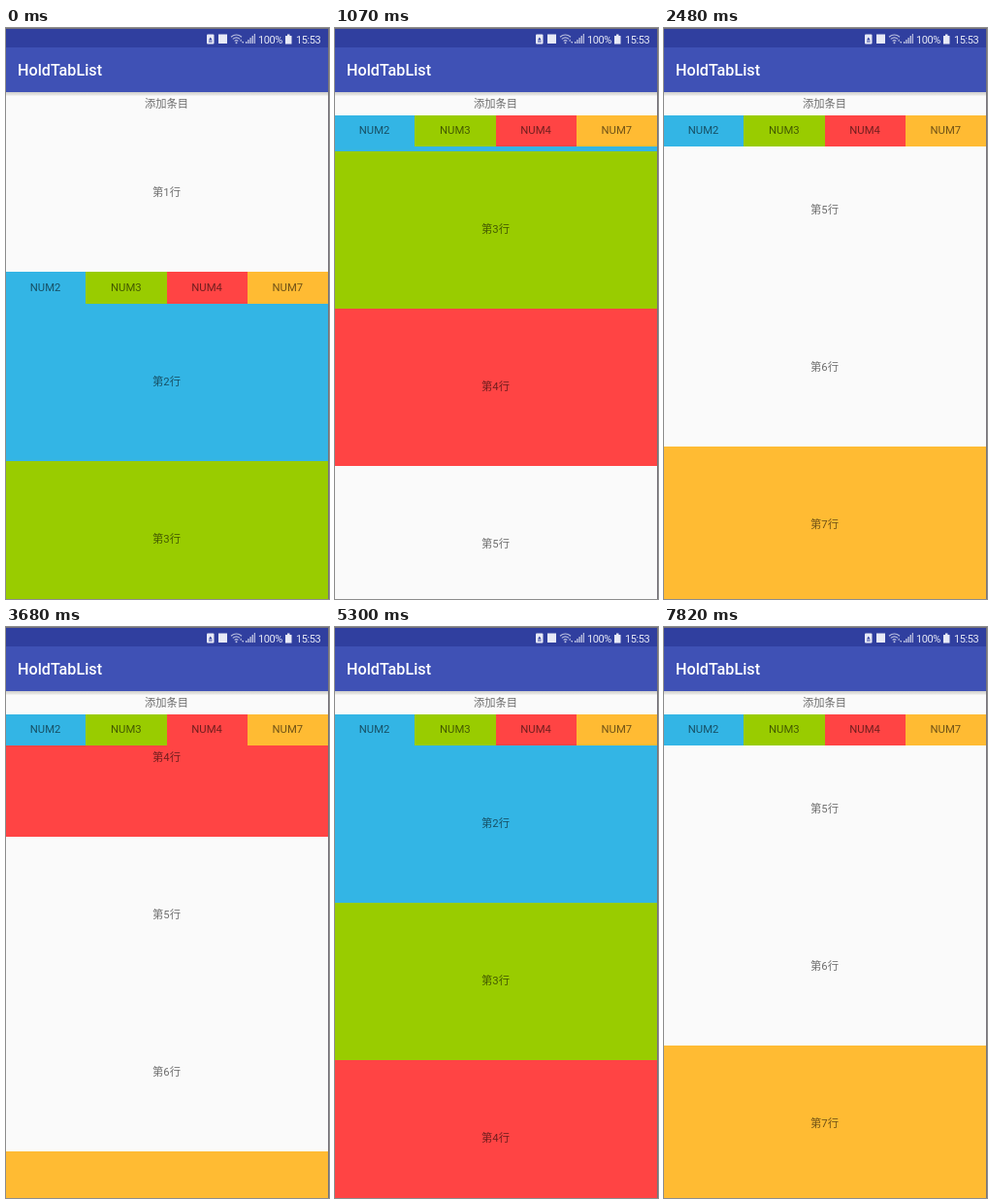
An HTML page that plays this animation: 333x588 px, repeating every 8000 ms.

```html
<!DOCTYPE html>
<html lang="zh-CN">
<head>
<meta charset="utf-8">
<title>Sticky tabs</title>
<style>
  html, body { margin: 0; width: 100%; height: 100%; overflow: hidden; }
  #stage {
    position: relative; width: 333px; height: 588px; overflow: hidden;
    background: #fafafa; color: rgba(0, 0, 0, .56);
    font: 11.3px/1 Roboto, "Noto Sans CJK SC", "Noto Sans CJK", sans-serif;
  }
  #stage > * { position: absolute; left: -1px; width: 333px; }
  .mid { display: flex; align-items: center; justify-content: center; }
  #rows { top: 89px; }
  #rows .mid { height: 162px; }
  #rows .mid:first-child { margin-bottom: 33px; } /* room for the tabs */
  #tabs { top: 0; height: 33px; display: flex; }
  #tabs .mid { width: 25%; }
  #add { top: 66px; height: 24px; background: linear-gradient(#cfcfcc, #e6e6e3 3px, #fafafa 4px); }
  #add span { padding-top: 2px; }
  #bar { top: 20px; height: 46px; background: #3f51b5; }
  #bar span {
    position: absolute; left: 13px; top: 0; line-height: 47px;
    color: #fff; font-size: 16.2px; font-weight: 500;
  }
  #stage > #status { left: 0; top: 0; height: 20px; background: #303f9f; }
  #status text { font: 11px Roboto, sans-serif; letter-spacing: -.4px; }
  #stage > #edge {
    left: 0; top: 0; height: 588px; box-sizing: border-box;
    border: solid #77737a; border-width: 1px 1px 0 0;
  }
</style>
</head>
<body>
<div id="stage">
  <div id="rows"></div>
  <div id="tabs"></div>
  <div id="add" class="mid"><span>添加条目</span></div>
  <div id="bar"><span>HoldTabList</span></div>
  <svg id="status" width="333" height="20" fill="#e8eaf6">
    <rect x="207" y="6.5" width="7.5" height="10" rx="1"/>
    <path d="M209 12.5l1.8-3 1.8 3zM209 13.5h3.6v1h-3.6z" fill="#303f9f"/>
    <rect x="219" y="6.5" width="9" height="9.5"/>
    <g opacity=".75">
      <path d="M232 9.3q5.5-4.6 11 0M233.8 11.4q3.7-3 7.4 0M235.6 13.4q1.9-1.5 3.8 0"
            fill="none" stroke="#e8eaf6" stroke-width="1.2"/>
      <circle cx="237.5" cy="15.2" r="1"/>
      <path d="M241 13.5l1.2-2 1.2 2zM243 14l1.2 2 1.2-2z"/>
      <path d="M247 14h1.4v2h-1.4zM249.2 12h1.4v4h-1.4zM251.4 10h1.4v6h-1.4zM253.6 8h1.4v8h-1.4zM255.8 6h1.2v10h-1.2z"/>
    </g>
    <text x="260" y="15.5">100%</text>
    <path d="M288 8h2v-1.5h2.5V8h2v8.5H288z"/>
    <text x="299" y="15.5">15:53</text>
  </svg>
  <div id="edge"></div>
</div>
<script>
  const LOOP = 8000, TICK = 70;
  const ROW = 162, END = 663, TABS_HOME = 251, TABS_STUCK = 89;
  const PAPER = '#fafafa', BLUE = '#33b5e5', GREEN = '#99cc00', RED = '#ff4444', AMBER = '#ffbb33';
  const COLORS = [PAPER, BLUE, GREEN, RED, PAPER, PAPER, AMBER];

  const drag = (start, to, ticks, power) => ({ start, to, ticks, power });
  const tap = (start, row) => drag(start, Math.min(END, (row - 1) * ROW), 1, 1);

  // each move sets out from where the one before it ended
  const MOVES = [
    drag(500, 360, 12, 1.56),
    drag(1400, END, 6, 1.1),
    drag(3560, 236, 9, 1.17),
    drag(4190, 0, 3, 1),
    tap(5300, 2), tap(6230, 3), tap(7040, 4), tap(7820, 7)
  ];

  const rows = document.getElementById('rows');
  const tabs = document.getElementById('tabs');

  function addCell(parent, text, color) {
    const cell = document.createElement('div');
    cell.className = 'mid';
    cell.textContent = text;
    cell.style.background = color;
    parent.append(cell);
  }

  COLORS.forEach((color, i) => addCell(rows, `第${i + 1}行`, color));
  [2, 3, 4, 7].forEach(n => addCell(tabs, 'NUM' + n, COLORS[n - 1]));

  function scrollAt(time) {
    let offset = 0;
    for (const { start, to, ticks, power } of MOVES) {
      if (time < start) break;
      const done = Math.min(1, (Math.floor((time - start) / TICK) + 1) / ticks);
      offset += (to - offset) * (1 - (1 - done) ** power);
    }
    return Math.round(offset);
  }

  function draw() {
    const offset = scrollAt(performance.now() % LOOP);
    rows.style.transform = `translateY(${-offset}px)`;
    tabs.style.transform = `translateY(${Math.max(TABS_STUCK, TABS_HOME - offset)}px)`;
    requestAnimationFrame(draw);
  }
  draw();
</script>
</body>
</html>
```
